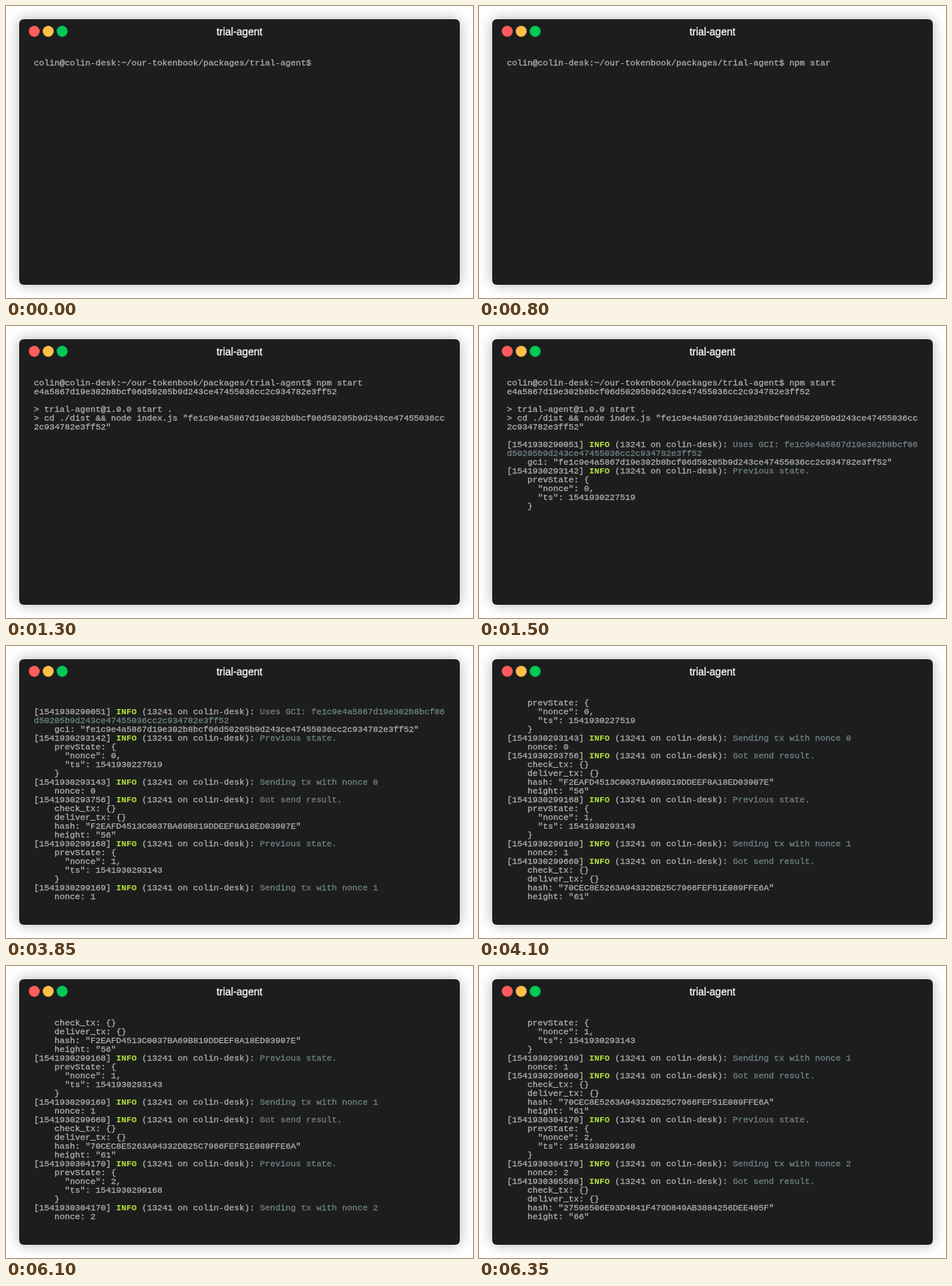
An HTML page for the animation above (8 s loop, 636 px wide and 398 px high).

```html
<!DOCTYPE html>
<html lang="en">
<head>
<meta charset="utf-8">
<title>Terminal</title>
<style>
  html, body { margin: 0; width: 100%; height: 100%; overflow: hidden; background: #fff; }
  #window {
    position: absolute; left: 18px; top: 18px; width: 600px; height: 362px;
    border-radius: 6px; background: #1d1d1d; box-shadow: 0 0 18px rgba(0, 0, 0, .3);
  }
  #title {
    text-align: center; color: #fff; -webkit-text-stroke: .3px;
    font: 14px/34px "Liberation Sans", Arial, sans-serif;
  }
  .dot { position: absolute; top: 9px; width: 15px; height: 15px; border-radius: 50%; }
  #screen {
    position: absolute; left: 20px; top: 54px; margin: 0; color: #afafaf;
    font: 11.667px/12px "Liberation Mono", monospace; -webkit-text-stroke: .3px;
  }
  .info { color: #b3e33b; font-weight: bold; -webkit-text-stroke: 0; }
  .msg { color: #708387; }
</style>
</head>
<body>
<div id="window">
  <div class="dot" style="left: 13px; background: #ff5c5c"></div>
  <div class="dot" style="left: 32px; background: #ffbd4c"></div>
  <div class="dot" style="left: 51px; background: #00ca56"></div>
  <div id="title">trial-agent</div>
  <pre id="screen"></pre>
</div>
<script>
const LOOP = 8000, ROWS = 23, COLS = 80;
const HOST = 'colin-desk', APP = 'trial-agent';
const PROMPT = `colin@${HOST}:~/our-tokenbook/packages/${APP}$ `;
const COMMAND = 'npm start';
const TAIL = 'e4a5867d19e302b8bcf06d50205b9d243ce47455036cc2c934782e3ff52';
const GCI = 'fe1c9' + TAIL;

// Split text into terminal rows; the first row may be shorter.
function wrap(text, first = COLS) {
  const rows = [text.slice(0, first)];
  for (let i = first; i < text.length; i += COLS) rows.push(text.slice(i, i + COLS));
  return rows;
}

function log(time, message, ...body) {
  const stamp = `[1541930${time}] `, source = ` (13241 on ${HOST}): `;
  const used = stamp.length + 4 + source.length;
  const rows = wrap(message, COLS - used).map(s => `<span class="msg">${s}</span>`);
  rows[0] = `${stamp}<span class="info">INFO</span>${source}${rows[0]}`;
  return [...rows, ...body.map(s => '    ' + s)];
}

const previous = (time, nonce, ts) => log(time, 'Previous state.',
  'prevState: {', `  "nonce": ${nonce},`, `  "ts": 1541930${ts}`, '}');
const sending = (time, nonce) => log(time, 'Sending tx with nonce ' + nonce, 'nonce: ' + nonce);
const result = (time, hash, height) => log(time, 'Got send result.',
  'check_tx: {}', 'deliver_tx: {}', `hash: "${hash}"`, `height: "${height}"`);

// Each entry: time in ms, rows printed at that time.
const output = [
  [1100, [TAIL]],
  [1300, ['', `> ${APP}@1.0.0 start .`, ...wrap(`> cd ./dist && node index.js "${GCI}"`)]],
  [1400, ['', ...log(290051, 'Uses GCI: ' + GCI, `gci: "${GCI}"`)]],
  [1500, previous(293142, 0, 227519)],
  [1600, sending(293143, 0)],
  [1850, result(293756, 'F2EAFD4513C0037BA69B819DDEEF8A18ED03907E', 56)],
  [3850, [...previous(299168, 1, 293143), ...sending(299169, 1)]],
  [4100, result(299660, '70CEC8E5263A94332DB25C7966FEF51E089FFE6A', 61)],
  [6100, [...previous(304170, 2, 299168), ...sending(304170, 2)]],
  [6350, result(305588, '27596506E93D4841F479D849AB3884256DEE405F', 66)],
];

const screen = document.getElementById('screen');
let shown;

function draw(now) {
  const t = now % LOOP;
  const lines = [PROMPT + COMMAND.slice(0, Math.floor(t / 100))];
  for (const [time, rows] of output) if (t >= time) lines.push(...rows);
  const html = lines.slice(-ROWS).join('\n');
  // A leading space keeps an empty first row from being dropped.
  if (html !== shown) screen.innerHTML = (shown = html).replace(/^\n/, ' \n');
  requestAnimationFrame(draw);
}
draw(performance.now());
</script>
</body>
</html>
```
